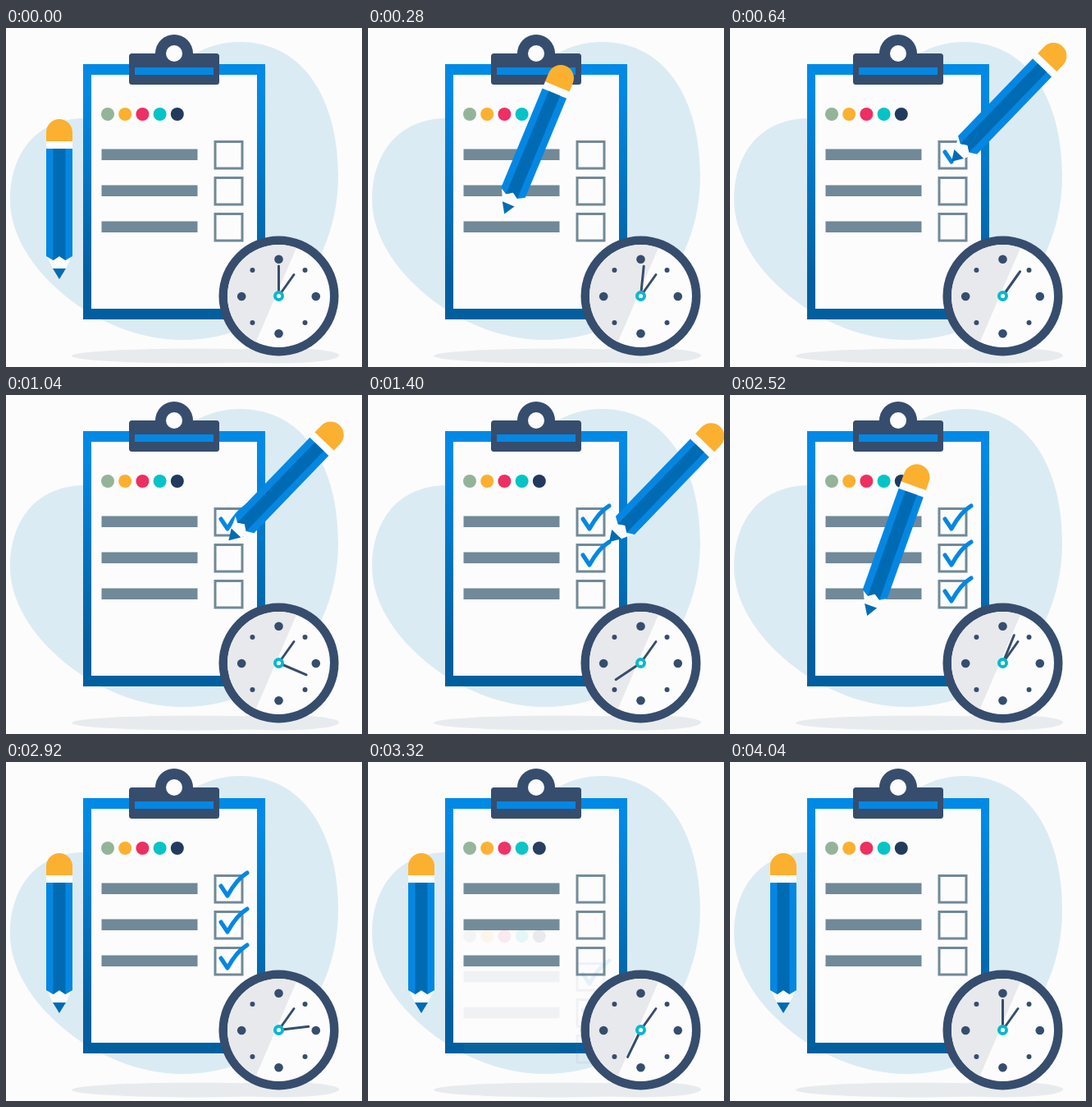
Write an HTML page that moves like this. It is 434 px wide and 413 px high and loops after 5000 ms.

```html
<!DOCTYPE html>
<html lang="en">
<head>
<meta charset="utf-8">
<title>Checklist</title>
<style>
  html, body { margin: 0; width: 100%; height: 100%; overflow: hidden; background: #fcfcfc; }
  svg { display: block; width: 434px; height: 413px; }
  .navy { fill: #364d6d; }
  .blue { fill: #0487e2; }
  .deep { fill: #006bb3; }
  .paper { fill: #fcfcfc; }
  .bar { fill: #718998; }
  .box { fill: none; stroke: #718998; stroke-width: 3; }
  .tick { fill: none; stroke: #0487e2; stroke-width: 5; stroke-linecap: round; stroke-linejoin: round; }
  .hand { stroke: #364d6d; stroke-width: 3; stroke-linecap: round; }
</style>
</head>
<body>
<svg viewBox="0 0 434 413">
  <defs>
    <linearGradient id="edge" x1="0" y1="0" x2="0" y2="1">
      <stop offset="0.1" stop-color="#008ae6"/>
      <stop offset="0.85" stop-color="#005f9e"/>
    </linearGradient>
    <clipPath id="face"><circle cx="332.5" cy="326.5" r="62.5"/></clipPath>
  </defs>

  <path fill="#dbebf3" d="M5 210C5 150 40 108 100 110C170 110 200 17 285 17C365 17 405 90 405 180C405 290 330 380 215 380C110 380 5 290 5 210Z"/>
  <g fill="#e8ebee">
    <ellipse cx="229" cy="399.5" rx="149" ry="9"/>
    <ellipse cx="333" cy="399" rx="73" ry="9.5"/>
  </g>

  <rect x="94" y="44" width="222" height="311" fill="url(#edge)"/>
  <rect class="paper" x="104" y="57" width="202" height="285"/>

  <g id="fresh"><g id="list"></g></g>
  <g id="done"><use href="#list"/><g id="ticks"></g></g>

  <circle class="navy" cx="205" cy="31" r="23"/>
  <rect class="navy" x="150" y="31" width="110" height="38" rx="3.5"/>
  <rect class="blue" x="157" y="48" width="96" height="9"/>
  <circle class="paper" cx="205" cy="31" r="10"/>

  <!-- pencil with its tip at the origin -->
  <g id="pencil">
    <path fill="#fcb02f" d="M-16 -167V-179A16 16 0 0 1 16 -179V-167Z"/>
    <rect class="paper" x="-16" y="-168" width="32" height="9"/>
    <path class="paper" d="M-16 -30H16L8 -13H-8Z"/>
    <path class="blue" d="M-16 -159H16V-28L7.5 -23L0 -28L-7.5 -23L-16 -28Z"/>
    <path class="deep" d="M-7.5 -159H7.5V-23L0 -28L-7.5 -23Z"/>
    <path class="deep" d="M-8 -13H8L0 0Z"/>
  </g>

  <circle class="navy" cx="332.5" cy="326.5" r="73"/>
  <circle class="paper" cx="332.5" cy="326.5" r="62.5"/>
  <path clip-path="url(#face)" fill="#e8e9ec" d="M360 254L298 398H260V254Z"/>
  <g id="marks" class="navy"></g>
  <path class="hand" d="M332.5 326.5L351 300.5"/>
  <path id="minute" class="hand" d="M332.5 326.5V290"/>
  <circle cx="332.5" cy="326.5" r="6.5" fill="#04b9cc"/>
  <circle class="paper" cx="332.5" cy="326.5" r="2.6"/>
</svg>
<script>
const LOOP = 5000, STEP = 40, ROW = 44, TILT = 44;
const REST = [65, 306];
const DRAW = 220, STARTS = [560, 1180, 1860];
const $ = id => document.getElementById(id);

function add(parent, tag, attrs) {
  const el = document.createElementNS('http://www.w3.org/2000/svg', tag);
  for (const k in attrs) el.setAttribute(k, attrs[k]);
  return $(parent).appendChild(el);
}

['#94b49a', '#fcb02f', '#ee2f62', '#04c4c8', '#213a5e'].forEach((fill, i) =>
  add('list', 'circle', { cx: 124 + i * 21.2, cy: 105, r: 8, fill }));

const ticks = STARTS.map((_, i) => {
  const dy = i * ROW;
  add('list', 'rect', { class: 'bar', x: 116.5, y: 147.5 + dy, width: 117, height: 13.5 });
  add('list', 'rect', { class: 'box', x: 255, y: 138.5 + dy, width: 33, height: 32.5 });
  return add('ticks', 'path', {
    class: 'tick',
    d: `M262 ${151 + dy}l8 12c6 -11 14 -22 24 -28`
  });
});
const length = ticks[0].getTotalLength();

for (let i = 0; i < 8; i++) {
  const a = i * Math.PI / 4, major = i % 2 === 0;
  add('marks', 'circle', {
    cx: 332.5 + 45.3 * Math.sin(a), cy: 327 - 45.3 * Math.cos(a), r: major ? 5.3 : 3
  });
}

const clamp = u => Math.min(1, Math.max(0, u));
const span = (t, a, b) => clamp((t - a) / (b - a));
const smooth = u => u * u * (3 - 2 * u);
const mix = (a, b, u) => a + (b - a) * u;

// cubic-bezier(.667, 0, .667, 1)
function swing(x) {
  let lo = 0, hi = 1;
  for (let i = 0; i < 24; i++) {
    const s = (lo + hi) / 2;
    if (2 * s * (1 - s) + s * s * s < x) lo = s; else hi = s;
  }
  return smooth(lo);
}

const drawn = (t, i) => Math.pow(span(t, STARTS[i], STARTS[i] + DRAW), 1.25);

function tipOn(i, f) {
  const p = ticks[i].getPointAtLength(length * f);
  return [p.x, p.y];
}

// Stops: start, end, place from, place to, tilt from, tilt to
const first = tipOn(0, 0), last = tipOn(2, 1);
const moves = [
  [0, 550, REST, first, 0, TILT],
  [790, 1180, tipOn(0, 1), tipOn(1, 0), TILT, TILT],
  [1440, 1860, tipOn(1, 1), tipOn(2, 0), TILT, TILT],
  [2220, 2780, last, REST, TILT, 0]
];

function pencilAt(t) {
  const k = moves.findLastIndex(m => t >= m[0]);
  const [a, b, p, q, r0, r1] = moves[k];
  const f = k < 3 ? drawn(t, k) : 0;
  if (f > 0) return [...tipOn(k, f), TILT];
  const u = smooth(span(t, a, b));
  return [mix(p[0], q[0], u), mix(p[1], q[1], u), mix(r0, r1, u)];
}

function render(t) {
  const [x, y, r] = pencilAt(t);
  $('pencil').setAttribute('transform', `translate(${x} ${y}) rotate(${r})`);

  ticks.forEach((el, i) => {
    const f = drawn(t, i);
    el.style.visibility = f > 0 ? 'visible' : 'hidden';
    el.setAttribute('stroke-dasharray', `${length * f + (f === 1 ? 1 : 0)} 999`);
  });

  const fall = span(t, 2940, 3355);
  $('done').setAttribute('transform', `translate(0 ${117 * fall})`);
  $('done').setAttribute('opacity', 1 - fall);
  $('fresh').setAttribute('opacity', t < 2940 ? 0 : span(t, 2940, 3330));

  const turn = t < 4000 ? swing(t % 2000 / 2000) * 360 : 0;
  $('minute').setAttribute('transform', `rotate(${turn} 332.5 326.5)`);
}

const begin = performance.now();
function tick() {
  const t = (performance.now() - begin) % LOOP;
  render(Math.floor(t / STEP) * STEP);
  requestAnimationFrame(tick);
}
render(0);
requestAnimationFrame(tick);
</script>
</body>
</html>
```
